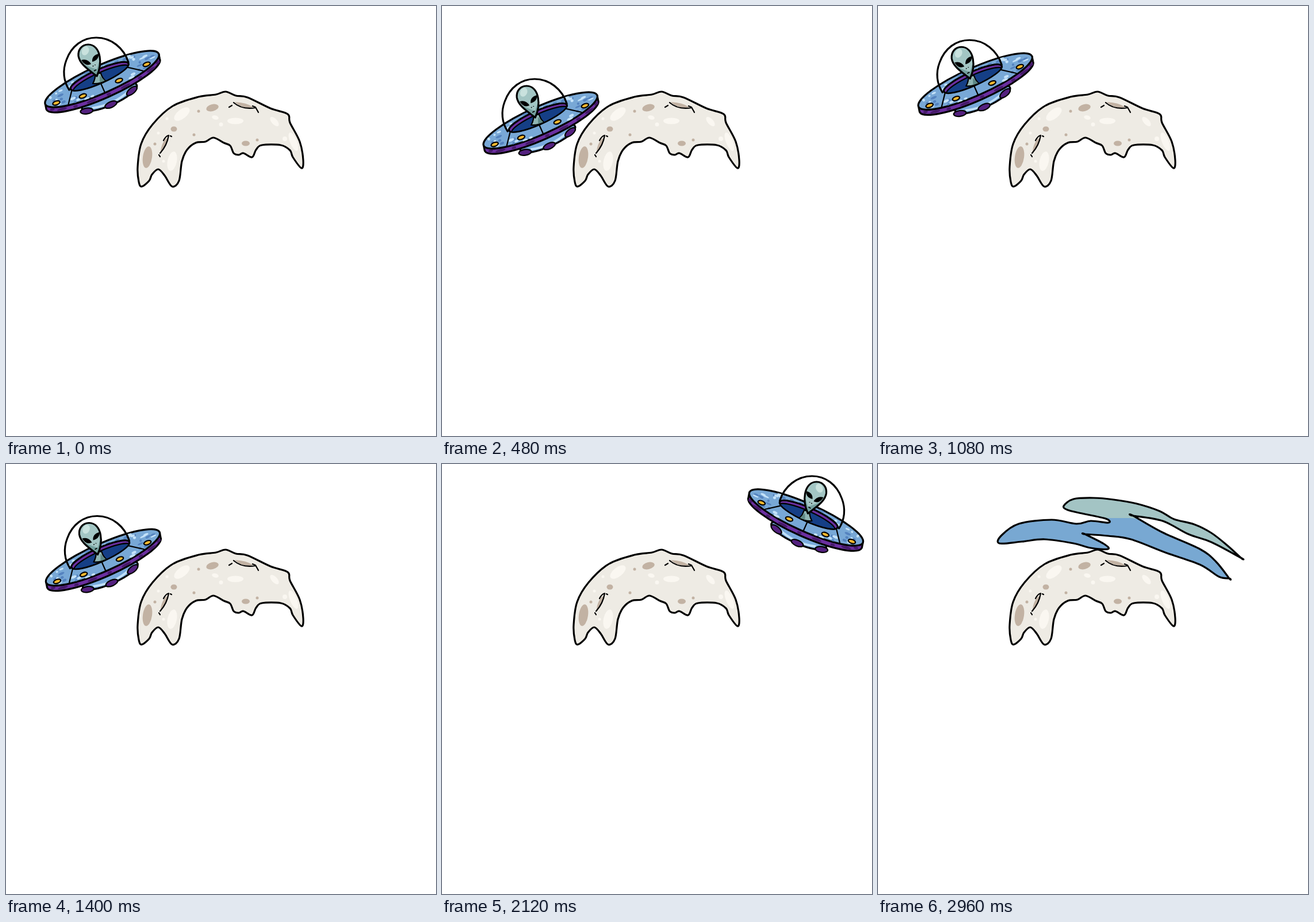
An HTML page for the animation above (3000 ms loop, 748x748 px).

```html
<!DOCTYPE html>
<html lang="en">
<head>
<meta charset="utf-8">
<title>Saucer over the moon</title>
<style>
html, body { margin: 0; width: 100%; height: 100%; overflow: hidden; background: #fff; }
svg { display: block; width: 100vw; height: 100vh; }
.ink { stroke: #000; stroke-width: 3.2; stroke-linejoin: round; stroke-linecap: round; }
.thin { stroke-width: 2.2; }
.line { fill: none; }
</style>
</head>
<body>
<svg viewBox="0 0 748 748">
  <defs>
    <clipPath id="upper"><path d="M300 40H660V195L615 172 560 140 500 114 455 96 440 94H300Z"/></clipPath>
    <clipPath id="headClip"><path d="M143 67C131 67 125 77 126 87C128 101 144 111 158 122C163 111 165 99 163 88C161 76 154 67 143 67Z"/></clipPath>
    <clipPath id="pitClip"><ellipse cx="-2" cy="-6" rx="55" ry="12"/></clipPath>
    <clipPath id="discClip"><ellipse rx="106" ry="23"/></clipPath>
  </defs>

  <g id="moon">
    <path id="rock" fill="#eeebe4"/>
    <g id="rockSpots"></g>
    <path fill="#c2b2a3" d="M269 253Q270 240 278 231L282 230Q279 244 269 253ZM398 167Q419 168 430 176Q412 180 398 167Z"/>
    <path id="rockEdge" class="ink line"/>
    <path class="ink line thin" d="M268 256Q280 243 283 225Q278 226 274 234M266 259L268 262M286 226L288 227M396 168Q411 181 434 177M388 176L393 173M429 174L434 176 439 185"/>
  </g>

  <g id="ufo">
    <g transform="translate(167 127) rotate(-24)">
      <ellipse class="ink" cx="-1" cy="34" rx="52" ry="14" fill="#79aadb"/>
      <path d="M-36 39Q0 50 34 38" fill="none" stroke="#c3e1f8" stroke-width="3.5"/>
      <g id="feet" class="ink thin" fill="#54217f"></g>
      <path class="ink" fill="#6b2fa0" d="M-108 0L-110 9A108 24 0 0 0 106 9L108 0Z"/>
      <g id="rimMarks"></g>
      <ellipse class="ink" rx="108" ry="24" fill="#78a8d6"/>
      <g id="discSpots" clip-path="url(#discClip)"></g>
      <path id="seams" class="ink line thin"/>
      <g id="lights" class="ink thin" fill="#f5b82e"></g>
      <ellipse class="ink" cx="-2" cy="-6" rx="55" ry="12" fill="#6b2fa0"/>
      <ellipse class="ink thin" cx="-1" cy="-1" rx="53" ry="11" fill="#153f86" clip-path="url(#pitClip)"/>
      <ellipse class="ink line thin" cx="-2" cy="-6" rx="55" ry="12"/>
    </g>
    <g id="alien">
      <path class="ink thin" fill="#8fb5b3" d="M155 117Q156 126 151 135Q163 136 173 130Q167 125 165 117Z"/>
      <path d="M163 121L172 130 163 133Z" fill="#5e8885"/>
      <g clip-path="url(#headClip)">
        <rect x="120" y="60" width="50" height="70" fill="#a3c6c4"/>
        <path fill="#74a09e" d="M126 96Q142 106 158 110L164 90 170 126 150 126Z"/>
        <ellipse cx="138" cy="78" rx="6" ry="8" fill="#c9e2de" transform="rotate(25 138 78)"/>
      </g>
      <path class="ink line" d="M143 67C131 67 125 77 126 87C128 101 144 111 158 122C163 111 165 99 163 88C161 76 154 67 143 67Z"/>
      <path d="M131 94Q142 91 148 101Q138 106 131 94ZM150 97Q149 86 161 83Q162 94 150 97Z"/>
      <path class="line" stroke="#000" stroke-width="1.8" d="M153 113L157 111M151 104L152 105M155 102L155 103"/>
    </g>
    <path class="ink line" d="M110 146C100 131 98 112 105 94C114 69 134 55 157 55C183 55 205 73 213 98"/>
  </g>

  <g id="smear">
    <path id="smearLow" fill="#78a8d2"/>
    <path id="smearTop" fill="#a3c4c4" clip-path="url(#upper)"/>
    <path id="smearEdge" class="ink line" vector-effect="non-scaling-stroke"/>
  </g>
</svg>
<script>
const el = id => document.getElementById(id);

// Smooth closed curve through "x,y" key points; a repeated point makes a sharper tip.
function curve(keys) {
  const pts = keys.trim().split(/\s+/).map(p => p.split(',').map(Number));
  const at = i => pts[(i + pts.length) % pts.length];
  return pts.reduce((d, b, i) => {
    const a = at(i - 1), c = at(i + 1), e = at(i + 2);
    const p = b.map((v, k) => v + (c[k] - a[k]) / 6);
    const q = c.map((v, k) => v - (e[k] - b[k]) / 6);
    return d + `C${p} ${q} ${c}`;
  }, 'M' + pts[0]) + 'Z';
}

function spot(id, fill, x, y, rx = 2.5, ry = rx, turn = 0) {
  const s = document.createElementNS('http://www.w3.org/2000/svg', 'ellipse');
  const attrs = { cx: x, cy: y, rx, ry, transform: `rotate(${turn} ${x} ${y})` };
  if (fill) attrs.fill = fill;
  for (const k in attrs) s.setAttribute(k, attrs[k]);
  el(id).append(s);
}

let seed = 11;
const rand = (lo, hi) => {
  seed = seed * 16807 % 2147483647;
  return lo + (hi - lo) * seed / 2147483647;
};

// Moon
const rock = curve(`
  229,280 235,240 255,206 290,174 335,158 365,154 382,149 400,156 420,159 460,178
  490,188 494,203 511,236 517,268 514,282 499,263 494,251 478,242 445,242 435,250
  428,263 413,256 405,259 396,256 390,243 379,238 361,229 347,236 330,238 315,250
  306,270 301,304 289,314 276,295 265,284 254,293 249,304 236,314 231,306`);
for (const id of ['rock', 'rockEdge']) el(id).setAttribute('d', rock);

const dark = [[246, 263, 8, 19, 8], [292, 214, 5.5, 4.5], [359, 177, 11, 6, -15], [417, 239, 7, 4.5],
  [335, 183], [327, 224], [259, 240], [437, 233]];
const pale = [[306, 188, 16, 8, -38], [399, 200, 14, 5.5], [364, 194, 6, 3.5, 15], [374, 206, 3.5],
  [467, 201, 5, 10, -42], [500, 236, 6, 17, -22], [485, 231, 4], [289, 270, 8, 17, 12], [274, 270], [265, 221], [280, 196]];
dark.forEach(s => spot('rockSpots', '#c2b2a3', ...s));
pale.forEach(s => spot('rockSpots', '#faf7f1', ...s));

// Saucer, in the tilted axes of its disc
let seams = '';
for (const k of [-1, 0, 1]) {
  const side = Math.abs(k);
  spot('feet', '', 43 * k - 4, 47 - 7 * side, 11, 5, -16 * k);
  seams += `M${52 * k - 5} ${6 - 8 * side}L${71 * k - 5 * (1 - side)} ${24 - 8 * side}`;
}
el('seams').setAttribute('d', seams);
for (let k = 0; k < 4; k++) {
  const a = (33 + 41.5 * k) * Math.PI / 180;
  spot('lights', '', 97 * Math.cos(a), 15 * Math.sin(a), 6.5, 3.4, 4);
}
for (let k = 0; k < 9; k++) {
  const a = (20 + 17.5 * k) * Math.PI / 180;
  spot('rimMarks', '#451a68', 107 * Math.cos(a), 5 + 24 * Math.sin(a), 4 + k % 2 * 5, 2.2, 60 / Math.PI * (0.5 - k / 8) * -1.2);
}
for (let k = 0; k < 46; k++) {
  const a = rand(0, 2 * Math.PI), r = rand(0.66, 0.95);
  spot('discSpots', k % 2 ? '#c4e2f9' : '#5583bf', 108 * r * Math.cos(a), 24 * r * Math.sin(a), rand(2, 6), rand(1.3, 2.6));
}

// Dash streak
const streak = curve(`
  323,73 340,61 375,59 410,62 450,69 490,82 515,96 550,105 580,120 608,142 631,163 631,163
  580,136 540,122 495,99 444,90 444,90 495,119 560,148 588,170 611,199 611,199
  593,196 560,175 500,154 440,131 400,125 360,122 360,122 393,139 400,148 370,146
  340,138 290,131 250,135 211,138 215,124 245,104 302,97 345,104 370,99 401,102 396,95
  355,86 330,80`);
for (const id of ['smearLow', 'smearTop', 'smearEdge']) el(id).setAttribute('d', streak);

const LOOP = 3000, TICK = 40;
// time, x, y of the hover, joined by straight moves
const hover = [[0, 0, 0], [520, 4.5, 78], [1120, 2, -1], [1680, 1, 72], [1760, 1, 62]];
// start, kind, centre x, centre y, flip, turn, scale
const dashes = [
  [1800, 'smear', 380, 128, -1, 0, 1],
  [1840, 'ufo', 600, 121, -1, 11, 1],
  [2080, 'smear', 613, 103, -1, 33, 0.45],
  [2120, 'ufo', 632.5, 87, -1, 0, 1],
  [2480, 'smear', 628, 145, 1, -90, 0.5],
  [2520, 'ufo', 626, 198, -1, -7, 1],
  [2960, 'smear', 420, 128, 1, 0, 1]
];
const centre = { ufo: [168, 121], smear: [420, 128] };

function hoverAt(t) {
  const i = Math.max(1, hover.findIndex(h => h[0] >= t));
  const [a, b] = [hover[i - 1], hover[i]];
  const f = (t - a[0]) / (b[0] - a[0]);
  return [a[1] + (b[1] - a[1]) * f, a[2] + (b[2] - a[2]) * f];
}

function place(kind, x, y, flip, turn, scale) {
  const [cx, cy] = centre[kind];
  for (const k in centre) el(k).style.display = k === kind ? '' : 'none';
  el(kind).setAttribute('transform',
    `translate(${x} ${y}) scale(${flip * scale} ${scale}) rotate(${turn}) translate(${-cx} ${-cy})`);
  el('alien').setAttribute('transform', flip < 0 ? 'translate(6 -2)' : '');
}

function draw(now) {
  const t = Math.floor(now % LOOP / TICK) * TICK;
  const dash = dashes.filter(d => d[0] <= t).pop();
  if (dash) {
    place(...dash.slice(1));
  } else {
    const [x, y] = hoverAt(t);
    place('ufo', centre.ufo[0] + x, centre.ufo[1] + y, 1, 0, 1);
  }
}

const start = performance.now();
function frame() {
  draw(performance.now() - start);
  requestAnimationFrame(frame);
}
frame();
</script>
</body>
</html>
```
